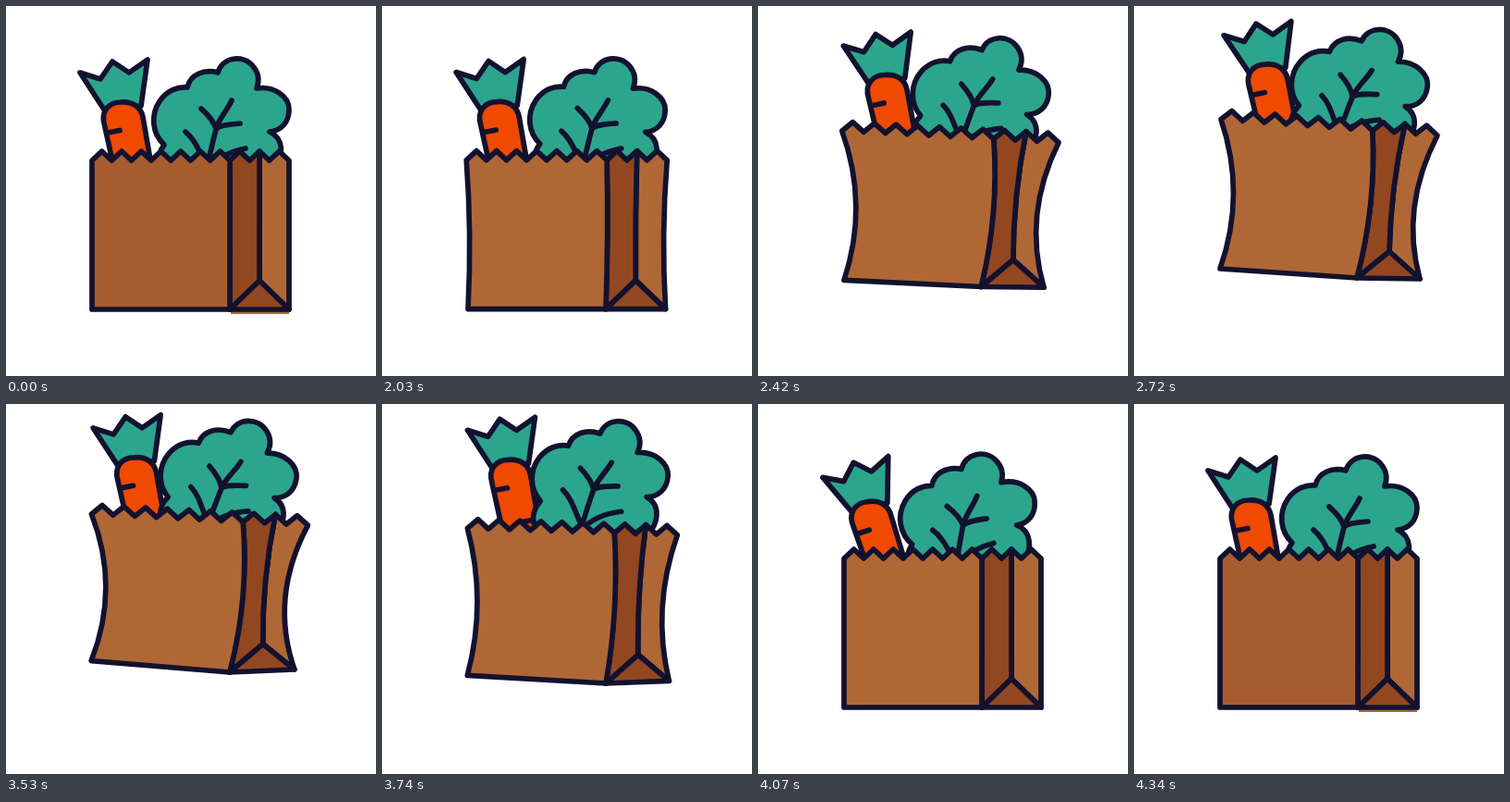
Recreate the animation shown at these times as an HTML page. Size 400 by 400 pixels, loop 4.37 s.

```html
<!DOCTYPE html>
<html lang="en">
<head>
<meta charset="utf-8">
<title>Grocery bag</title>
<style>
  html, body { margin: 0; width: 100%; height: 100%; overflow: hidden; background: #fff; }
  svg { display: block; width: 100vw; height: 100vh; }
  path { stroke: #12122f; stroke-width: 5.7; stroke-linejoin: round; stroke-linecap: round; }
  .leaf { fill: #2ca58d; }
  .root { fill: #f04900; }
  .line { fill: none; }
  .dark { fill: #934720; }
  .light { fill: #b06736; }
</style>
</head>
<body>
<svg viewBox="0 0 400 400">
  <g id="carrot">
    <path class="leaf" d="M106 112L80 72L102 79L115 60L133 72L153 58L146 108Z"/>
    <path class="root" d="M116 172L106.500 129C102 114 111 104 124 104C138 103 146 110 148 120L157 172L150 200L130 205Z"/>
    <path class="line" d="M110 137L123 134.500M140 171L152 169"/>
  </g>
  <g id="lettuce">
    <path class="leaf" d="M176 190C162 176 162 162 171 150C158 138 156 118 166 103C174 91 186 87 196 88C199 74 214 68 229 72C234 55 256 52 267 65C273 72 274 81 271 89C290 86 306 98 306 112C306 126 297 135 285 136C300 143 302 162 288 178L250 205L205 205Z"/>
    <path class="line" d="M244 102C239 113 230 122 227 133C224 146 221 155 217 178M211 111C220 119 225 125 227 133C231 129 240 128 253 127M194 136C204 144 208 156 216 170M259 154C243 157 228 164 217 178"/>
  </g>
  <rect id="edge" x="243" y="328" width="63" height="5" fill="#a9653a"/>
  <path id="right" class="light"/>
  <path id="gusset" class="dark"/>
  <path id="base" class="dark"/>
  <path id="front"/>
</svg>
<script>
const LOOP = 4370, START = 2030, END = 4340, STEP = 30;

const el = id => document.getElementById(id);
const ramp = (t, a, b) => Math.min(1, Math.max(0, (t - a) / (b - a)));
const smooth = (t, a, b) => { const u = ramp(t, a, b); return u * u * (3 - 2 * u); };
const bump = (t, a, b) => Math.sin(Math.PI * ramp(t, a, b));
const pt = p => p.map(v => v.toFixed(2)).join(" ");
const bend = (a, b, k) => "Q" + pt([(a[0] + b[0]) / 2 + 2 * k, (a[1] + b[1]) / 2]) + " " + pt(b);

// Shared motion: quick flare, rise, late drift, each fading as the part falls
function hop(t, fallStart, fallEnd) {
  const held = 1 - smooth(t, fallStart, fallEnd);
  return {
    flare: Math.sin(ramp(t, 2000, 2260) * Math.PI / 2) * held,
    rise: smooth(t, 1990, 2650) * held,
    drift: smooth(t, 3110, 3700) * held
  };
}

function drawBag(t) {
  const { flare, rise, drift } = hop(t, 3620, 3930);
  const tl = [93 - 10.5 * flare + 11.5 * rise - 2 * drift, 167 - 44.5 * rise - 4.5 * drift];
  const tr = [306 + 11.5 * flare + 10.5 * rise - 2 * drift, 167 - 27 * rise - 11 * drift];
  const bl = [93 - drift, 328 - 44 * rise - 8 * drift];
  const foot = [242 - rise + drift, 328 - 34 * rise - 5 * drift];
  const br = [306 + 3 * flare + 3.5 * drift, 328 - 33 * rise - 10 * drift];
  const tip = [(foot[0] + br[0]) / 2 + rise, (foot[1] + br[1]) / 2 - 31 + 2 * rise];
  const k = 14 * flare + 2 * drift;

  const teeth = Array.from({ length: 21 }, (_, i) => [
    tl[0] + (tr[0] - tl[0]) * i / 20,
    tl[1] + (tr[1] - tl[1]) * i / 20 - (i % 2) * 10
  ]);
  const zig = (a, b) => "M" + teeth.slice(a, b + 1).map(pt).join("L");
  const set = (id, d) => el(id).setAttribute("d", d + "Z");
  const fold = teeth[14], mid = teeth[17];

  set("front", zig(0, 14) + bend(fold, foot, k * 0.45) + "L" + pt(bl) + bend(bl, tl, k));
  set("gusset", zig(14, 17) + bend(mid, tip, -k * 0.25) + "L" + pt(foot) + bend(foot, fold, k * 0.45));
  set("right", zig(17, 20) + bend(tr, br, -k * 1.1) + "L" + pt(tip) + bend(tip, mid, -k * 0.25));
  set("base", "M" + pt(foot) + "L" + pt(tip) + "L" + pt(br));
}

function place(id, x, y, turn, cx, cy) {
  el(id).setAttribute("transform", `translate(${x} ${y}) rotate(${turn} ${cx} ${cy})`);
}

// The food lands after the bag, leaning left as it settles
function drawFood(t) {
  const { flare, rise, drift } = hop(t, 3660, 4120);
  const lean = bump(t, 3650, 4250), sway = bump(t, 3860, 4260) ** 2;
  place("lettuce", 11 * rise - 4 * drift - 8 * lean, -35 * rise - 9 * drift,
    3.5 * flare + 4 * rise - 4.5 * lean, 225, 119);
  place("carrot", 18 * rise - 4.5 * drift - 5 * sway, -41 * rise - 6.5 * drift + 3 * sway,
    drift - rise - 7 * sway, 126, 120);
}

function draw(time) {
  const now = time % LOOP;
  const resting = now < START || now >= END;
  const t = resting ? 0 : START + Math.floor((now - START) / STEP) * STEP;
  drawFood(t);
  drawBag(t);
  el("front").setAttribute("fill", resting ? "#a65c2e" : "#b06736");
  el("edge").setAttribute("visibility", resting ? "visible" : "hidden");
}

const begin = performance.now();
function tick() {
  draw(performance.now() - begin);
  requestAnimationFrame(tick);
}
tick();
</script>
</body>
</html>
```
